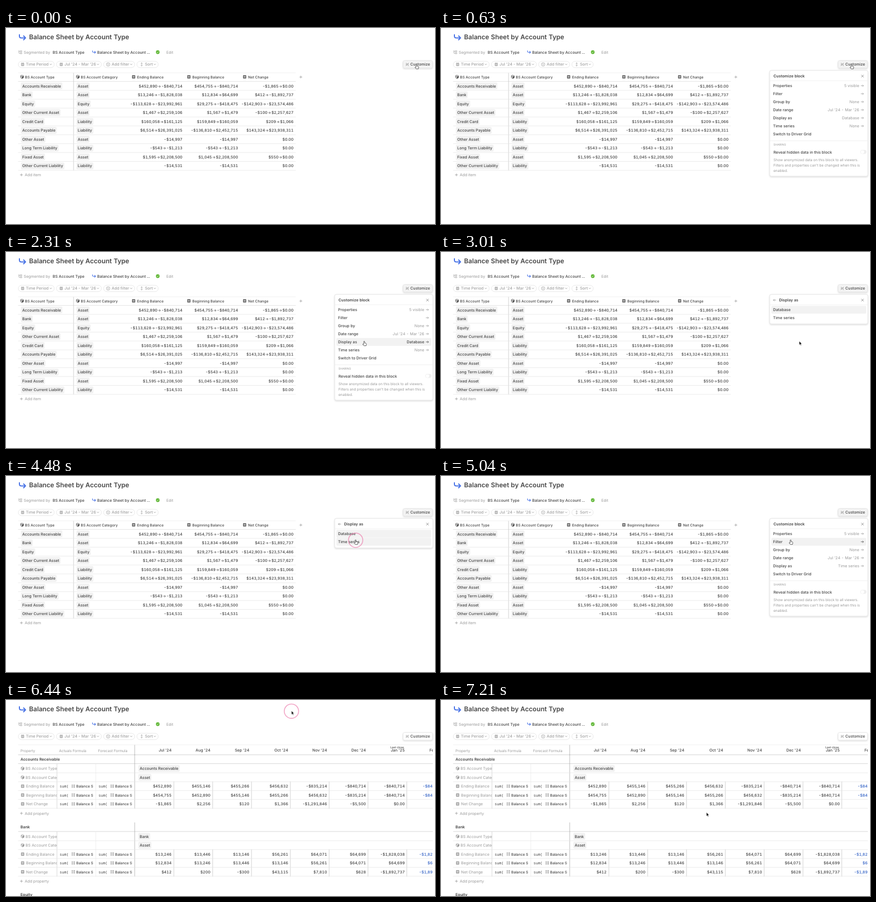
Write an HTML page that moves like this. It is 800 by 365 pixels and loops after 7630 ms.

```html
<!DOCTYPE html>
<html lang="en">
<head>
<meta charset="utf-8">
<title>Balance Sheet by Account Type</title>
<style>
  html, body { margin: 0; width: 100%; height: 100%; overflow: hidden; background: #fff; }
  svg { display: block; width: 100vw; height: 100vh; }
  text { font: 500 7.22px Inter, sans-serif; font-variant-numeric: tabular-nums; fill: #444;
         text-rendering: geometricPrecision; white-space: pre; }
  .r { text-anchor: end; }
  .g { fill: #999; font-weight: 400; }
  .s { font-size: 6.7px; }
  .note { font-size: 6.62px; }
  .b { font-weight: 600; }
  .blue { fill: #2f5fc4; }
  .title { font-size: 12.15px; font-weight: 600; fill: #484848; }
  .pill { font-size: 7.4px; font-variant-numeric: normal; fill: #a2a2a2; }
  .tiny { font-size: 5.2px; }
  .mono { font-family: "Noto Sans Mono", "DejaVu Sans Mono", monospace; font-size: 7px; }
  .line { fill: none; stroke-linecap: round; stroke-linejoin: round; }
</style>
</head>
<body>
<svg viewBox="0 0 800 365">
  <defs>
    <clipPath id="stageClip"><rect width="796" height="365"/></clipPath>
    <clipPath id="labelClip"><rect width="95" height="365"/></clipPath>
    <filter id="shadow" x="-10%" y="-10%" width="120%" height="130%">
      <feDropShadow dx="0" dy="1.3" stdDeviation="1.5" flood-opacity=".16"/>
    </filter>
  </defs>
  <g id="top"></g>
  <g id="database"></g>
  <g id="series"></g>
  <g id="button"></g>
  <g id="panel"></g>
  <circle id="ring" fill="none" stroke="#ec7fae" stroke-width="1.6"/>
  <g id="cursor">
    <path id="arrow" d="M0 0V7.2L1.7 5.7 2.8 8.3 4 7.8 2.9 5.2H5.1Z" fill="#111" stroke="#fff" stroke-width=".6"/>
    <path id="hand" d="M-.9 .6Q0 -.5 .9 .6V3.4L3.4 4.1Q4.3 4.5 4.1 5.6L3.5 8.6H-.7L-2.9 5.8Q-2.5 4.7 -.9 5.8Z"
          fill="#fff" stroke="#333" stroke-width=".75" stroke-linejoin="round"/>
  </g>
</svg>
<script>
const LOOP = 7630, STEP = 70;
const $ = id => document.getElementById(id);

// Drawing helpers; y is the vertical centre of a text line.
const text = (x, y, s, cls = '') => `<text x="${x}" y="${y + 2.6}" class="${cls}">${s}</text>`;
const path = (d, color = '#999', width = .8) =>
  `<path class="line" d="${d}" stroke="${color}" stroke-width="${width}"/>`;
const rect = (x, y, w, h, r, fill, stroke = 'none') =>
  `<rect x="${x}" y="${y}" width="${w}" height="${h}" rx="${r}" fill="${fill}" stroke="${stroke}" stroke-width=".7"/>`;
const hLine = (x1, x2, y, color = '#e2e2e2') => path(`M${x1} ${y}H${x2}`, color, .7);
const vLine = (x, y1, y2, color = '#c8c8c8') => path(`M${x} ${y1}V${y2}`, color, .8);

const chevron = (x, y) => path(`M${x - 1.5} ${y - .8}l1.5 1.6 1.5-1.6`);
const rightArrow = (x, y, color) => path(`M${x - 2.3} ${y}h4.6m-1.8-1.8l1.8 1.8-1.8 1.8`, color, .7);
const cross = (x, y) => path(`M${x - 2} ${y - 2}l4 4m0-4l-4 4`, '#777', .8);
const plus = (x, y) => path(`M${x - 2.2} ${y}h4.4m-2.2-2.2v4.4`, '#999', .8);
const cube = (x, y, color) =>
  `<path d="M${x} ${y - .2}v3.2l2.7-1.4v-3.2z" fill="${color}"/>` +
  path(`M${x} ${y - 3}l2.7 1.4v3.2l-2.7 1.4-2.7-1.4v-3.2zM${x - 2.7} ${y - 1.6}l2.7 1.4 2.7-1.4M${x} ${y - .2}v3.2`, color, .9);
const numberIcon = (x, y, color) => rect(x - 3, y - 3, 6, 6, 1, color) +
  path(`M${x - 1} ${y - 1.6}v3.2m2-3.2v3.2M${x - 1.8} ${y - .7}h3.6m-3.6 1.4h3.6`, '#fff', .5);
const calendar = (x, y) => rect(x - 2.8, y - 2.6, 5.6, 5.6, 1, '#aaa') +
  path(`M${x - 1.8} ${y - .6}h3.6m-3.6 1.6h3.6`, '#fff', .6) + path(`M${x - 1.4} ${y - 3.2}v1m2.8-1v1`, '#aaa');
const dots = (x, y) => [-2.2, 0, 2.2].map(dy => path(`M${x - 2.6} ${y + dy}h1.4m2 0h1.8`, '#777', 1)).join('');
const bend = (x, y, k, w) =>
  path(`M${x} ${y}v${2.5 * k}q0 ${3.5 * k} ${3.5 * k} ${3.5 * k}h${8 * k}m${-3.6 * k} ${-3.6 * k}l${3.6 * k} ${3.6 * k} ${-3.6 * k} ${3.6 * k}`, '#4a74e6', w);

function topBar() {
  const pills = [[23, 67, 37, 'Time Period', 83.5], [94, 84, 109, "Jul '24 - Mar '26", 171.5],
                 [182, 58, 197, 'Add filter', 233.5], [244, 40, 259, 'Sort', 277.5]];
  return bend(25, 12.4, 1, 2) + text(43, 18.7, 'Balance Sheet by Account Type', 'title') +
    path('M24 42v5h2M24 43.5h2M27 42.3h2.6v2H27zM27 46h2.6v2H27z', '#aaa') +
    text(33, 45, 'Segmented by', 'g') + text(87, 45, 'BS Account Type') +
    bend(161.3, 42.2, .5, 1.1) + text(170, 45, 'Balance Sheet by Account ...') +
    '<circle cx="283" cy="45" r="3.4" fill="#5cb531"/>' + path('M281.4 45l1.2 1.2 2-2.3', '#fff') +
    text(299, 45, 'Edit', 'g') +
    pills.map(([x, w, tx, label, cx]) =>
      rect(x, 62, w, 11.8, 5.9, '#fff', '#dedede') + text(tx, 67.8, label, 'pill') + chevron(cx, 67.8)).join('') +
    calendar(31, 67.8) + calendar(103, 67.8) +
    '<circle cx="190.5" cy="67.8" r="3.3" fill="none" stroke="#aaa" stroke-width=".8"/>' +
    path('M188.8 66.8h3.4m-2.7 1.3h2m-1.3 1.3h.6', '#aaa', .6) +
    path('M253 64.8v6m-1.4-4.6l1.4-1.4 1.4 1.4m-2.8 3.2l1.4 1.4 1.4-1.4', '#aaa');
}

const ACCOUNTS = [
  'Accounts Receivable|Asset|$452,890→-$840,714|$454,755→-$840,714|-$1,865→$0.00',
  'Bank|Asset|$13,246→-$1,828,038|$12,834→$64,699|$412→-$1,892,737',
  'Equity|Equity|-$113,628→-$23,992,961|$29,275→-$418,475|-$142,903→-$23,574,486',
  'Other Current Asset|Asset|$1,467→$2,259,106|$1,567→$1,479|-$100→$2,257,627',
  'Credit Card|Liability|$160,058→$161,125|$159,849→$160,059|$209→$1,066',
  'Accounts Payable|Liability|$6,514→$26,391,025|-$136,810→$2,452,715|$143,324→$23,938,311',
  'Other Asset|Asset|-$14,997|-$14,997|$0.00',
  'Long Term Liability|Liability|-$543→-$1,213|-$543→-$1,213|$0.00',
  'Fixed Asset|Asset|$1,595→$2,208,500|$1,045→$2,208,500|$550→$0.00',
  'Other Current Liability|Liability|-$14,531|-$14,531|$0.00'
].map(row => row.split('|'));

function databaseView() {
  const withArrow = s => s.replace(/→(.*)/, '<tspan dx=".6" font-size="6.5">→</tspan><tspan dx=".6">$1</tspan>');
  const heads = [[30, 'BS Account Type', cube], [134, 'BS Account Category', cube], [238, 'Ending Balance', numberIcon],
                 [341, 'Beginning Balance', numberIcon], [445, 'Net Change', numberIcon]];
  let out = hLine(23, 540, 83.5, '#ececec') + hLine(23, 540, 99.5, '#d8d8d8') + plus(549.8, 91.3) +
    vLine(126, 84, 265, '#c4c4c4') + plus(28.8, 273.5) + text(35, 273.5, 'Add item', 'g');
  for (const [x, label, icon] of heads) out += icon(x, 91, '#555') + text(x + (x < 200 ? 5.6 : 6.5), 91, label, 's');
  ACCOUNTS.forEach(([name, category, ...values], i) => {
    const y = 107.9 + i * 16.55;
    out += hLine(23, 540, y + 8.2) + text(30.2, y, name, 'chip') + text(133.8, y, category, 'chip') +
      values.map((v, c) => text([329, 432.7, 536.2][c], y, withArrow(v), 'r')).join('');
  });
  return out;
}

const MONTHS = ["Jul '24", "Aug '24", "Sep '24", "Oct '24", "Nov '24", "Dec '24", "Jan '25", "Feb '25"];
const SECTIONS = [
  ['Accounts Receivable', [
    '$452,890 $455,146 $455,266 $456,632 -$835,214 -$840,714 -$840,714 -$840,714',
    '$454,755 $452,890 $455,146 $455,266 $456,632 -$835,214 -$840,714 -$840,714',
    '-$1,865 $2,256 $120 $1,366 -$1,291,846 -$5,500 $0.00']],
  ['Bank', [
    '$13,246 $13,446 $13,146 $56,261 $64,071 $64,699 -$1,828,038 -$1,828,038',
    '$12,834 $13,246 $13,446 $13,146 $56,261 $64,071 $64,699 $64,699',
    '$412 $200 -$300 $43,115 $7,810 $628 -$1,892,737 -$1,892,737']]
];
const columnRight = c => 308.6 + c * 72.5;

function seriesView() {
  let fixed = text(27, 94.8, 'Property', 's g') + text(99, 94.8, 'Actuals Formula', 's g') +
    text(171.8, 94.8, 'Forecast Formula', 's g') + hLine(23, 796, 83.5, '#ececec') +
    hLine(23, 796, 102, '#bdbdbd') + vLine(240, 84, 102, '#aaa') + text(742, 87.3, 'Last close', 'r tiny') +
    MONTHS.map((m, c) => text(columnRight(c), 93.6, m, 'r')).join('');
  let labels = '', later = '';
  SECTIONS.forEach(([name, rows], s) => {
    const top = s * 126.4;
    const at = i => top + 127.5 + i * 16.5;
    fixed += text(27, top + 110, name, 'b') + hLine(23, 796, top + 118.5, '#c8c8c8') +
      vLine(95, top + 119, top + 202, '#d0d0d0') + vLine(240, top + 102, top + 202, '#aaa') +
      vLine(167.5, top + 119, top + 202, '#ededed') +
      text(249.2, at(0), name, 'chip') + text(249.2, at(1), 'Asset', 'chip') +
      plus(28.8, top + 211) + text(35, top + 211, 'Add property', 'g');
    for (let c = 0; c < 7; c++) fixed += vLine(313 + c * 72.4, top + 152, top + 202);
    ['BS Account Type', 'BS Account Category', 'Ending Balance', 'Beginning Balance', 'Net Change'].forEach((label, i) => {
      fixed += hLine(23, 796, at(i) + 8.2);
      labels += (i < 2 ? cube : numberIcon)(31, at(i), '#999') + text(i < 2 ? 36.6 : 37.6, at(i), label, 'g');
    });
    rows.forEach((row, i) => {
      const y = at(i + 2);
      for (const x of [100, 172.5])
        fixed += text(x, y, 'sum(', 'mono') + dots(x + 25.5, y) + text(x + 31, y, 'Balance S', 's');
      row.split(' ').forEach((v, c) => {
        const cell = text(columnRight(c), y, v, c === 7 ? 'r blue' : 'r');
        if (c) later += cell; else fixed += cell;
      });
    });
  });
  fixed += text(27, 362.6, 'Equity', 'b');
  return `<g clip-path="url(#stageClip)">${fixed}<g id="loaded">${later}</g></g><g clip-path="url(#labelClip)">${labels}</g>`;
}

const buttonView = active =>
  `<g filter="url(#shadow)">${rect(740.5, 60.5, 55, 14.3, 3, active ? '#f3f3f3' : '#fff', '#e0e0e0')}</g>` +
  path('M746 70l4.4-4.4M746.4 65.6l1.4 1.4M749 69l1.4 1.2M746 67.8h.2M750.6 67.8h.2', '#666', .8) +
  text(754, 67.8, 'Customize');

function panelView(mode, hover) {
  const rowY = i => 107.5 + i * 15;
  const highlight = i => rect(616, rowY(i) - 7.3, 177, 14.6, 2, '#f2f2f2');
  const frame = bottom => `<g filter="url(#shadow)">${rect(613, 79, 183, bottom - 79, 3, '#fff', '#dadada')}</g>` +
    hLine(613, 796, 98.3, '#eee') + cross(786, 89.6);
  if (mode === 'display')
    return frame(134) + path('M624.5 89.6h-4.6m1.8-1.8l-1.8 1.8 1.8 1.8', '#888', .7) +
      text(630.5, 89.6, 'Display as', 'b') + highlight(0) + (hover === 1 ? highlight(1) : '') +
      text(619.3, rowY(0), 'Database') + text(619.3, rowY(1), 'Time series');

  const isSeries = mode === 'series';
  const items = [['Properties', '5 visible'], ['Filter', ''], ['Group by', 'None'], ['Date range', "Jul '24 - Mar '26"],
    ['Display as', isSeries ? 'Time series' : 'Database'], ...(isSeries ? [] : [['Time series', 'None']]),
    ['Switch to Driver Grid']];
  const shift = isSeries ? -15 : 0;
  return frame(276 + shift) + text(620, 89.6, 'Customize block', 'b') +
    items.map(([label, value], i) => {
      const on = i === hover, y = rowY(i);
      return (on ? highlight(i) : '') + text(619.3, y, label) + (value === undefined ? '' :
        text(780, y, value, on ? 'r' : 'r g') + rightArrow(785.6, y, on ? '#444' : '#999'));
    }).join('') +
    hLine(613, 796, 210 + shift, '#e8e8e8') + text(620, 216.6 + shift, 'SHARING', 'tiny g') +
    text(620, 231 + shift, 'Reveal hidden data in this block') +
    rect(782, 227 + shift, 11.5, 7.6, 3.8, '#efefef') + `<circle cx="786" cy="${230.8 + shift}" r="3.1" fill="#fff"/>` +
    ['Show anonymized data on this block to all viewers.', "Filters and properties can't be changed when this is", 'enabled.']
      .map((s, i) => text(620, 245.7 + i * 10 + shift, s, 'note g')).join('');
}

// Timeline
const CLICKS = [70, 2520, 4340, 6300];
const MOVES = [[1190, 2050, 668, 166], [3360, 4060, 652, 118.8], [5040, 5670, 532.3, 20], [6790, 7210, 495, 209.3]];
const PANELS = [[0, ''], [350, 'database'], [2730, 'display'], [4620, 'series'], [6370, '']];
const SERIES_AT = 5110, LOADED_AT = 5880;

// The pointer travels on a slight arc: its vertical part lags behind.
function cursorAt(t) {
  let x = 765.5, y = 67.5;
  for (const [start, end, toX, toY] of MOVES) {
    const p = Math.min(1, Math.max(0, (t - start) / (end - start))) ** .7;
    const eased = p * p * (3 - 2 * p);
    x += (toX - x) * eased;
    y += (toY - y) * eased ** 1.3;
  }
  return [x, y];
}

const show = (id, on) => $(id).setAttribute('display', on ? 'inline' : 'none');
const painted = {};
function paint(id, key, view) {
  if (painted[id] === key) return;
  painted[id] = key;
  $(id).innerHTML = view();
}

function draw(t) {
  const [x, y] = cursorAt(t);
  const mode = PANELS.findLast(([start]) => t >= start)[1];
  const rowCount = { database: 7, display: 2, series: 6 }[mode] || 0;
  const row = x > 613 && x < 796 ? Math.floor((y - 100) / 15) : -1;
  const hover = row >= 0 && row < rowCount ? row : -1;
  const onButton = x > 740 && x < 796 && y > 60 && y < 75;

  show('database', t < SERIES_AT);
  show('series', t >= SERIES_AT);
  show('loaded', t >= LOADED_AT);
  const active = onButton || mode !== '';
  paint('button', active, () => buttonView(active));
  paint('panel', mode + hover, () => mode ? panelView(mode, hover) : '');

  $('cursor').setAttribute('transform', `translate(${x} ${y})`);
  show('hand', onButton || hover >= 0);
  show('arrow', !onButton && hover < 0);

  const click = CLICKS.find(c => t >= c && t < c + 350);
  show('ring', click !== undefined);
  if (click !== undefined) {
    const p = (t - click) / 350;
    const ring = $('ring');
    ring.setAttribute('cx', x);
    ring.setAttribute('cy', y + .8);
    ring.setAttribute('r', 6 + 11.5 * (1 - (1 - p) ** 2));
    ring.setAttribute('opacity', 1 - p * .75);
  }
}

$('top').innerHTML = topBar();
$('database').innerHTML = databaseView();
$('series').innerHTML = seriesView();
for (const label of document.querySelectorAll('.chip')) {
  const x = +label.getAttribute('x'), y = +label.getAttribute('y') - 8.9;
  label.outerHTML = rect(x - 2.4, y, label.getComputedTextLength() + 4.8, 12.6, 2, '#f1f1f1') + label.outerHTML;
}

const begin = performance.now();
function tick() {
  const t = (performance.now() - begin) % LOOP;
  draw(Math.floor(t / STEP) * STEP);
  requestAnimationFrame(tick);
}
tick();
</script>
</body>
</html>
```
